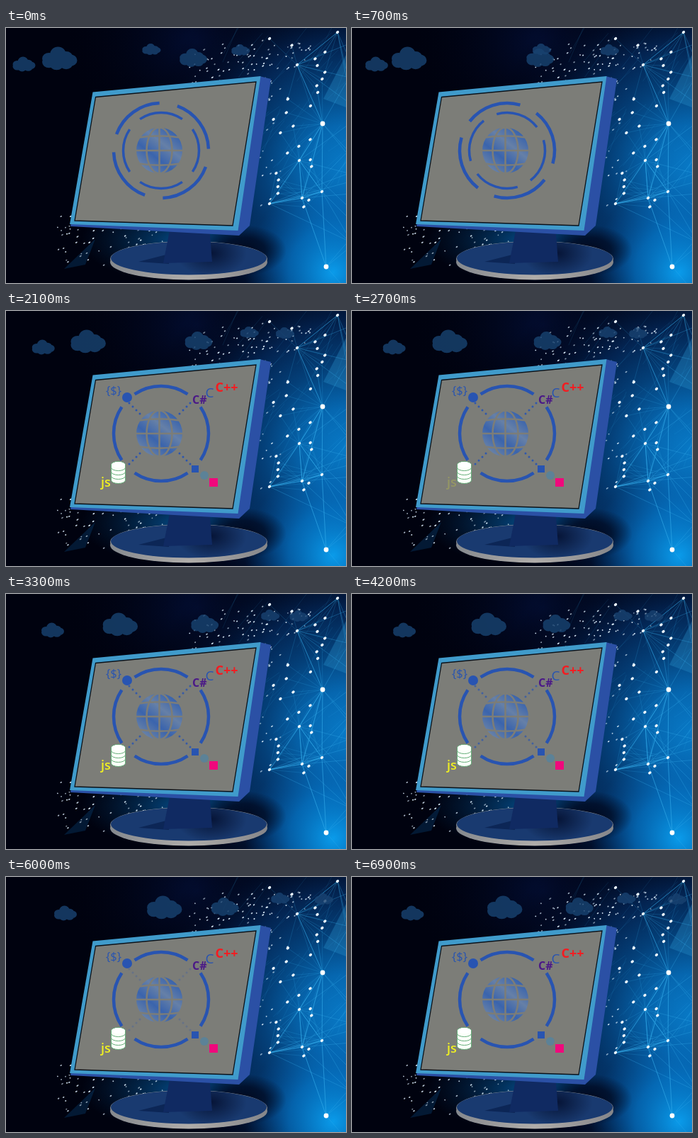
Animation, 480 px wide and 360 px high, one loop 7 s. Source, as an HTML page with a canvas:

```html
<!DOCTYPE html>
<html lang="en">
<head>
<meta charset="utf-8">
<title>Code monitor</title>
<style>
html, body { margin: 0; width: 100%; height: 100%; overflow: hidden; background: #00020f; }
canvas { display: block; width: 480px; height: 360px; }
</style>
</head>
<body>
<canvas id="stage" width="480" height="360"></canvas>
<script>
const W = 480, H = 360, LOOP = 7000, TAU = Math.PI * 2;
const BLUE = '#2854b1', GREY = '#7c7d78';
const stage = document.getElementById('stage').getContext('2d');
const scenery = document.createElement('canvas');
scenery.width = W;
scenery.height = H;

const sineOut = u => Math.sin(u * Math.PI / 2);
const swingBack = u => (1 - Math.cos(u * Math.PI * 7 / 6)) / 2;
const quartOut = u => 1 - (1 - u) ** 4;

const clouds = [
  { x: 25, y: 51, w: 33, h: 21, travel: 60, ease: sineOut },
  { x: 75, y: 43, w: 51, h: 33, travel: 148, ease: swingBack },
  { x: 264, y: 42, w: 40, h: 26, travel: 58, ease: u => u ** 1.7 },
  { x: 205, y: 30, w: 27, h: 16, travel: 182, ease: quartOut },
  { x: 331, y: 31, w: 27, h: 16, travel: 129, ease: u => u ** .6 }
];

const ramp = (t, from, to) => Math.max(0, Math.min(1, (t - from) / (to - from)));

function seeded(seed) {
  return () => (seed = (seed * 16807) % 2147483647) / 2147483647;
}

function poly(g, fill, points) {
  g.beginPath();
  points.forEach(([x, y]) => g.lineTo(x, y));
  g.closePath();
  g.fillStyle = fill;
  g.fill();
}

function oval(g, fill, x, y, rx, ry = rx, tilt = 0) {
  g.fillStyle = fill;
  g.beginPath();
  g.ellipse(x, y, rx, ry, tilt, 0, TAU);
  g.fill();
}

function glow(g, x, y, r, colors, sx = 1, sy = 1) {
  const fill = g.createRadialGradient(0, 0, 0, 0, 0, r);
  colors.forEach((color, i) => fill.addColorStop(i / (colors.length - 1), color));
  g.save();
  g.translate(x, y);
  g.scale(sx, sy);
  oval(g, fill, 0, 0, r);
  g.restore();
}

function paintSky(g) {
  g.fillStyle = '#00020f';
  g.fillRect(0, 0, W, H);
  glow(g, 270, 20, 190, ['rgba(3,16,58,.8)', 'rgba(0,2,15,0)'], 1, .8);
  glow(g, 480, 195, 290, ['#0879c6', '#0667b0', '#044079', '#032350', 'rgba(1,13,41,.6)', 'rgba(0,2,15,0)']);
  glow(g, 462, 345, 125, ['#0a9bea', 'rgba(5,125,210,.65)', 'rgba(4,90,170,0)']);
  glow(g, 250, 300, 120, ['rgba(5,100,175,.75)', 'rgba(4,60,110,0)'], 1.2, .5);
  poly(g, 'rgba(40,145,200,.35)', [[448, 100], [480, 38], [480, 112]]);
  poly(g, 'rgba(10,80,140,.3)', [[82, 340], [126, 298], [112, 334]]);
}

function paintNetwork(g) {
  const random = seeded(41);
  const hubs = [[447, 135], [452, 337], [446, 231], [418, 240], [414, 187], [411, 52], [468, 6], [372, 248]];
  const nodes = [...hubs];
  for (let i = 0; i < 26; i++) {
    const y = 15 + i * 9.5;
    nodes.push([372 + random() * 80, y]);
  }

  const distance = ([x, y], [u, v]) => Math.hypot(x - u, y - v);
  const line = ([x, y], [u, v], alpha) => {
    g.strokeStyle = `rgba(55,175,235,${alpha})`;
    g.beginPath();
    g.moveTo(x, y);
    g.lineTo(u, v);
    g.stroke();
  };
  g.lineWidth = .9;
  for (const hub of hubs) {
    for (const other of hubs) if (distance(hub, other) < 115) line(hub, other, .4);
    for (const node of nodes) if (distance(hub, node) < 65) line(hub, node, .22);
    for (let i = 0; i < 3; i++) line(hub, [W, hub[1] + (random() - .5) * 130], .35);
  }

  // Short slanted streaks rising towards the top right.
  for (let i = 0; i < 40; i++) {
    const x = 300 + random() * 170, y = 30 + random() * 200;
    line([x, y], [x + 20 + random() * 30, y - 30 - random() * 35], .13);
  }
  nodes.forEach(([x, y]) => oval(g, '#eef8ff', x, y, 2.4, 1.8, -.6));
  hubs.slice(0, 2).forEach(([x, y]) => oval(g, '#ffffff', x, y, 3.4));

  const sparkle = (count, place) => {
    for (let i = 0; i < count; i++) {
      const [x, y] = place(random(), random() + random() - 1);
      oval(g, `rgba(225,242,255,${.5 + random() * .5})`, x, y, .8 + random() * 1.1, .9, -.6);
    }
  };
  sparkle(85, (k, spread) => [255 + k * 175, 66 - k * 35 + spread * 38]);
  sparkle(60, (k, spread) => [72 + k * 150, 300 + spread * 45]);
  sparkle(30, (k, spread) => [372 + spread * 35, 75 + k * 180]);
}

function paintMonitor(g) {
  glow(g, 336, 314, 60, ['rgba(0,8,28,.95)', 'rgba(0,8,30,.75)', 'rgba(0,8,30,0)'], 1, .6);
  const rim = g.createLinearGradient(147, 0, 369, 0);
  rim.addColorStop(0, '#85898e');
  rim.addColorStop(.5, '#b0adaa');
  rim.addColorStop(1, '#85868a');
  oval(g, rim, 258, 330.5, 111, 25);
  oval(g, rim, 258, 326, 111, 25);
  g.save();
  g.beginPath();
  g.ellipse(258, 325, 110, 23.5, 0, 0, TAU);
  g.clip();
  g.fillStyle = '#193a70';
  g.fillRect(140, 295, 240, 60);
  glow(g, 290, 318, 50, ['rgba(3,14,45,.85)', 'rgba(3,14,45,0)'], 1, .65);
  poly(g, '#0c2656', [[187, 330], [230, 319], [230, 333]]);
  g.restore();
  poly(g, '#102a62', [[231, 286], [288, 290], [291, 330], [222, 332]]);

  poly(g, '#2b50a5', [[358, 68], [374, 72], [344, 279], [329, 293], [91, 280], [92, 275]]);
  poly(g, '#409bcb', [[122.5, 90.5], [359.5, 68], [327.5, 286], [90, 277]]);
  poly(g, GREY, [[126.5, 97.5], [353, 76], [320, 279], [97, 272]]);
  g.strokeStyle = '#0a1119';
  g.lineWidth = 1.3;
  g.stroke();
}

function paintGlobe(g) {
  const x = 216.5, y = 173, r = 32.5;
  const fill = g.createLinearGradient(x - 20, y + 25, x + 20, y - 25);
  ['#6680a7', '#3a64ad', '#6680a7', '#3a64ad'].forEach((color, i) => fill.addColorStop(i / 3, color));
  oval(g, fill, x, y, r);
  g.strokeStyle = GREY;
  g.lineWidth = 2.6;
  g.beginPath();
  g.moveTo(x, y - r);
  g.lineTo(x, y + r);
  g.moveTo(x + 18, y);
  g.ellipse(x, y, 18, r, 0, 0, TAU);
  for (let dy = -18; dy <= 18; dy += 18) {
    g.moveTo(x - r, y + dy);
    g.quadraticCurveTo(x, y + dy * 1.3, x + r, y + dy);
  }
  g.stroke();
}

function drawCloud(g, { x, y, w, h, travel, ease }, u) {
  g.save();
  g.translate(x + travel * ease(u), y);
  g.scale(w, h);
  g.fillStyle = 'rgba(24,66,112,.82)';
  g.beginPath();
  g.ellipse(-.03, -.18, .22, .32, 0, 0, TAU);
  for (let i = 0; i < 7; i++) {
    const angle = i * TAU / 7, px = .31 * Math.cos(angle), py = .08 + .17 * Math.sin(angle);
    g.moveTo(px + .19, py);
    g.ellipse(px, py, .19, .25, 0, 0, TAU);
  }
  g.fill();
  g.restore();
}

function drawRing(g, radius, start, width) {
  const quarter = TAU / 4, span = quarter * .755;
  g.strokeStyle = BLUE;
  g.lineWidth = width;
  for (let i = 0; i < 4; i++) {
    const from = start * TAU / 360 + i * quarter;
    g.beginPath();
    g.arc(219, 173, radius, from, from + span);
    g.stroke();
  }
}

function label(g, text, x, y, size, color, weight = 400) {
  g.font = `${weight} ${size}px "Open Sans", sans-serif`;
  g.fillStyle = color;
  g.fillText(text, x, y);
}

function square(g, color, x, y, size) {
  g.fillStyle = color;
  g.fillRect(x, y, size, size);
}

function drawDatabase(g, x, y) {
  g.lineWidth = 1;
  g.strokeStyle = '#65ad79';
  for (let i = 3; i >= 0; i--) {
    const top = y - 9 + i * 6;
    g.fillStyle = '#fbfff9';
    g.beginPath();
    g.ellipse(x, top, 10, 4.5, 0, Math.PI, TAU);
    g.ellipse(x, top + 4, 10, 4.5, 0, 0, Math.PI);
    g.closePath();
    g.fill();
    g.stroke();
  }
  oval(g, '#ffffff', x, y - 9, 9.5, 4);
}

function drawDots(g) {
  for (const sx of [-1, 1]) {
    for (const sy of [-1, 1]) {
      for (let reach = 28; reach < 45; reach += 5) {
        oval(g, BLUE, 217 + sx * reach, 173 + sy * reach, 1.5);
      }
    }
  }
}

function drawIcons(g, t) {
  const grow = ramp(t, 900, 1300);
  if (!grow) return;
  g.save();
  g.translate(217, 173);
  g.scale(grow, grow);
  g.translate(-217, -173);

  g.globalAlpha = 1 - ramp(t, 1400, 6900) ** 1.7;
  drawDots(g);
  g.globalAlpha = 1;

  label(g, '{$}', 141, 118, 16.5, BLUE);
  oval(g, BLUE, 171, 122, 7);
  label(g, 'C#', 263, 131, 16, '#4b1987', 700);
  label(g, 'C', 281.5, 122, 19, BLUE);
  label(g, 'C++', 295.5, 114, 18, '#f51b20', 700);
  drawDatabase(g, 158.5, 226);
  square(g, BLUE, 262, 218, 10);
  oval(g, '#5c8297', 280, 232, 6);
  square(g, '#f0087c', 287, 236, 12);

  g.globalAlpha = .1 + .9 * ramp(Math.abs(t - 2800), 50, 400);
  label(g, 'js', 134, 248, 18, '#eff022', 600);
  g.restore();
}

function render(now) {
  const t = Math.floor(now / 100) * 100 % LOOP;
  const turn = 36 * ramp(t, 0, 1400);
  stage.drawImage(scenery, 0, 0);
  clouds.forEach(cloud => drawCloud(stage, cloud, t / LOOP));
  drawRing(stage, 67, 20 + turn, 4.5);
  stage.globalAlpha = 1 - ramp(t, 800, 1100);
  drawRing(stage, 53.5, 56 + turn, 3.5);
  stage.globalAlpha = 1;
  drawIcons(stage, t);
}

const back = scenery.getContext('2d');
paintSky(back);
paintNetwork(back);
paintMonitor(back);
paintGlobe(back);

const begin = performance.now();
function tick() {
  render(performance.now() - begin);
  requestAnimationFrame(tick);
}
tick();
</script>
</body>
</html>
```
